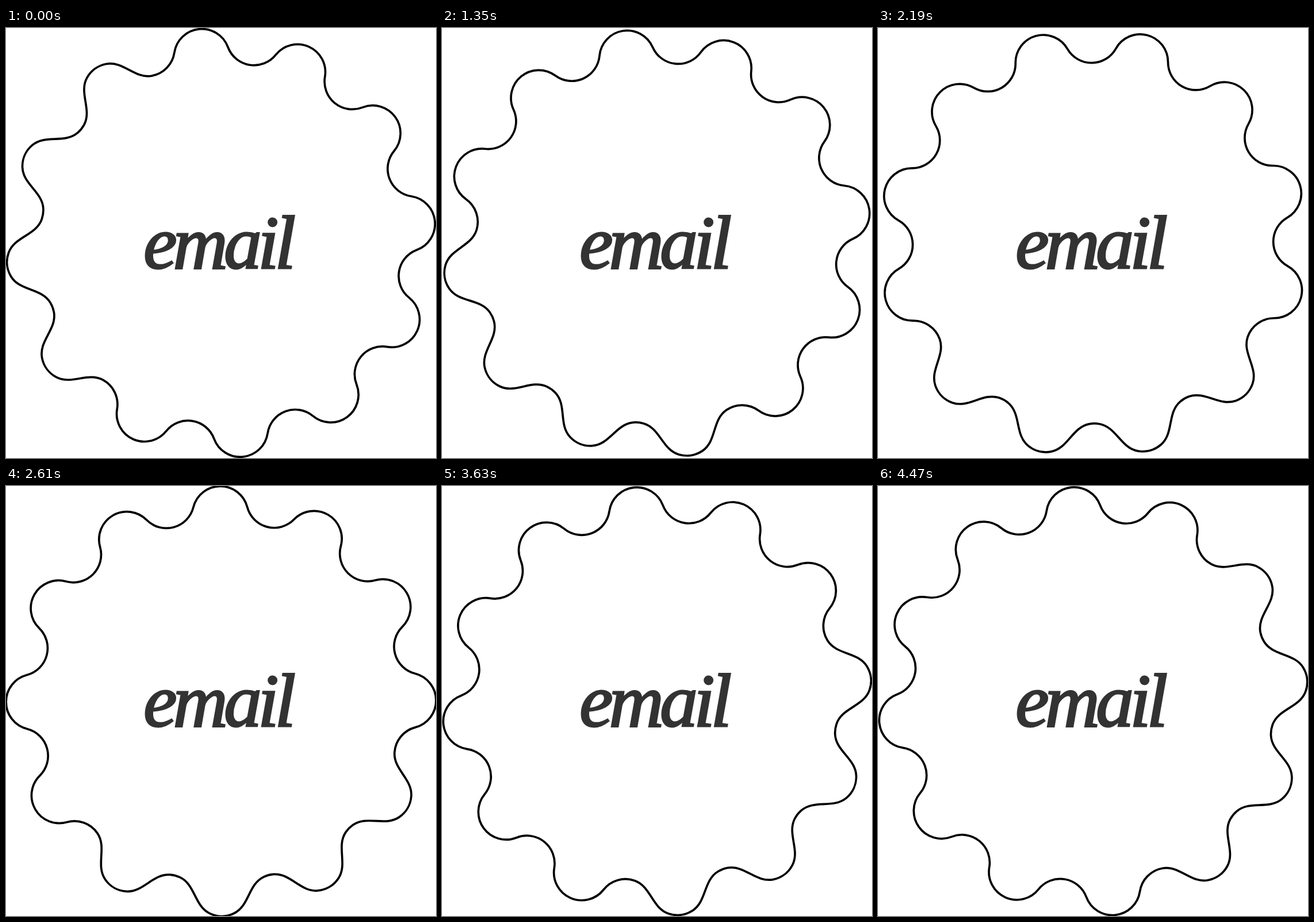
An HTML page that plays this animation: 748 by 748 pixels, repeating every 4500 ms.

```html
<!DOCTYPE html>
<html lang="en">
<head>
<meta charset="utf-8">
<title>email badge</title>
<style>
  html, body { margin: 0; height: 100%; overflow: hidden; background: #fff; }
  svg { display: block; width: 748px; height: 748px; }
  path { fill: none; stroke: #000; stroke-width: 3.7; stroke-linejoin: round; }
  text {
    font: italic 132px "Liberation Serif", "Times New Roman", serif;
    letter-spacing: -7px;
    fill: #333;
    stroke: #333;
    stroke-width: 3;
  }
</style>
</head>
<body>
<svg viewBox="0 0 748 748">
  <g id="badge"><path id="edge"/></g>
  <text x="239" y="418">email</text>
</svg>
<script>
const LOOP = 4500, STEP = 30, TURN_1 = 1920, TURN_2 = 2550;
const COUNT = 24, RAD = Math.PI / 180;
const badge = document.getElementById('badge');

const polar = (r, a) => [r * Math.cos(a), r * Math.sin(a)];
const add = (p, v, k = 1) => [p[0] + v[0] * k, p[1] + v[1] * k];
const fmt = (...points) => points.map(p => p.map(n => n.toFixed(2)).join(' ')).join(' ');

// Arc centres, counter-clockwise: even ones are lobes, odd ones are notches.
const centre = i => polar(i % 2 ? 362 : 325.6, (-95.87 - 15 * i) * RAD);

// Where arc i meets the next one; a third of the joints are eased.
function joint(i) {
  const p = centre(i), q = centre(i + 1);
  const dx = q[0] - p[0], dy = q[1] - p[1];
  const r = Math.hypot(dx, dy) / 2;
  const eased = i >= 1 && i <= 8;
  const side = i % 2 ? -1 : 1;
  const angle = Math.atan2(dy, dx) + (eased ? side * 50 * RAD : 0);
  const spoke = polar(r, angle);
  const handle = polar(30, angle - side * Math.PI / 2);
  const start = add(p, spoke), end = add(q, spoke, -1);
  return { r, start, end, c1: add(start, handle), c2: add(end, handle, -1), eased };
}

function outline() {
  let d = 'M' + fmt(joint(COUNT - 1).end);
  for (let i = 0; i < COUNT; i++) {
    const j = joint(i);
    d += `A${j.r} ${j.r} 0 0 ${i % 2} ${fmt(j.start)}`;
    if (j.eased) d += 'C' + fmt(j.c1, j.c2, j.end);
  }
  return d + 'Z';
}

// Two linear quarter turns, the second one slower.
const turn = t => t < TURN_1 ? 90 * t / TURN_1 : 90 + 90 * (t - TURN_1) / TURN_2;

function draw() {
  const t = Math.floor(performance.now() % LOOP / STEP) * STEP;
  badge.setAttribute('transform',
    `translate(374.2 374.1) rotate(${-turn(t)}) translate(-0.2 -0.2)`);
  requestAnimationFrame(draw);
}

document.getElementById('edge').setAttribute('d', outline());
draw();
</script>
</body>
</html>
```
